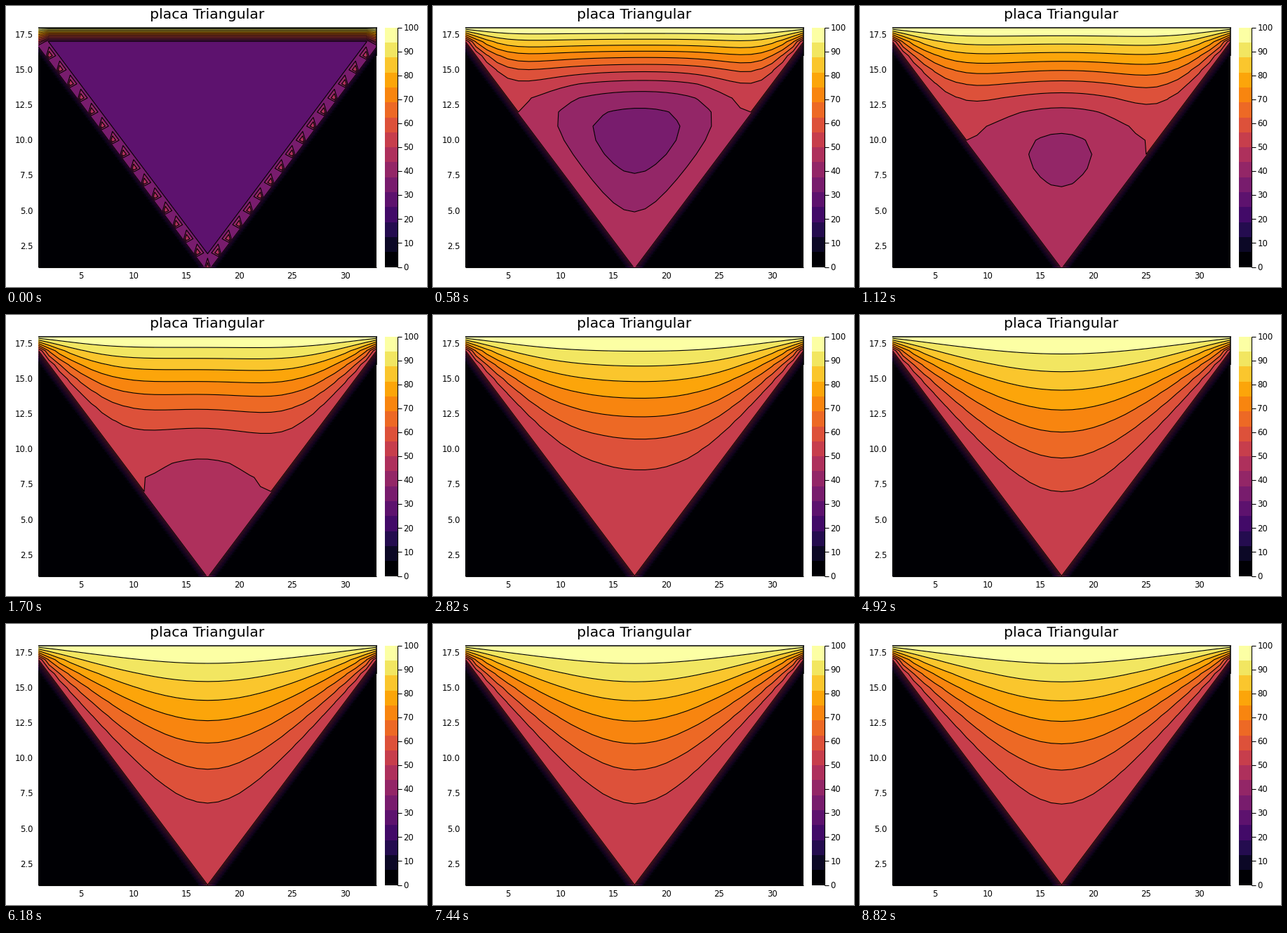
Animation, 600 px wide and 400 px high, one loop 8840 ms. Source, as a matplotlib script:

```python
import numpy as np
import matplotlib
import matplotlib.pyplot as plt
from matplotlib.animation import FuncAnimation
from matplotlib.patches import Rectangle

plt.rcParams["font.family"] = "DejaVu Sans"

W, H, DPI = 600, 400, 100
LEFT, RIGHT, TOP, BOTTOM = 46.3, 528.3, 30.7, 371.5
NX, NY, MID = 33, 18, 17
HOT, SIDE, START = 100.0, 50.0, 30.0
STEPS = 190
TICK_MS = 20
TICKS = 442

levels = np.linspace(0, 100, 17)
colors = [matplotlib.colormaps["inferno"](v) for v in np.linspace(0, 1, 16)]


def plate():
    """Triangular plate: hot top row, warm slanted sides, zero outside."""
    t = np.zeros((NY, NX))
    for y in range(1, NY):
        reach = y - 1
        t[y - 1, MID - 1 - reach:MID + reach] = START
        t[y - 1, [MID - 1 - reach, MID - 1 + reach]] = SIDE
    t[-1] = HOT
    return t


def sweep(t):
    """One Gauss-Seidel pass over the inner nodes."""
    for y in range(2, NY):
        r, reach = y - 1, y - 2
        for c in range(MID - 1 - reach, MID + reach):
            t[r, c] = (t[r - 1, c] + t[r + 1, c] + t[r, c - 1] + t[r, c + 1]) / 4


def solve():
    t = plate()
    states = [t.copy()]
    for _ in range(STEPS - 1):
        sweep(t)
        states.append(t.copy())
    return states


states = solve()

fig = plt.figure(figsize=(W / DPI, H / DPI), dpi=DPI, facecolor="white")
ax = fig.add_axes([LEFT / W, 1 - BOTTOM / H, (RIGHT - LEFT) / W, (BOTTOM - TOP) / H])
ax.set(xlim=(1, NX), ylim=(1, NY), xticks=[], yticks=[], facecolor="black")
for spine in ax.spines.values():
    spine.set_visible(False)

# Overlay in pixel coordinates, y pointing down
over = fig.add_axes([0, 0, 1, 1], facecolor="none")
over.set(xlim=(0, W), ylim=(H, 0))
over.axis("off")


def px(x):
    return LEFT + (x - 1) * (RIGHT - LEFT) / (NX - 1)


def py(y):
    return BOTTOM - (y - 1) * (BOTTOM - TOP) / (NY - 1)


def label(x, y, s, ha, size=8.35):
    over.text(x, y, s, ha=ha, va="baseline", fontsize=size, color="black")


def line(x, y, lw=0.8):
    over.plot(x, y, color="black", lw=lw, solid_capstyle="butt")


label(286.5, 18, "placa Triangular", "center", 14.7)
for v in range(5, 31, 5):
    label(px(v), 388, str(v), "center")
for v in np.arange(2.5, 18, 2.5):
    label(38.3, py(v) + 4.2, f"{v:.1f}", "right")

line([LEFT, RIGHT + 0.5], [TOP, TOP], 1.1)
line([RIGHT, RIGHT], [TOP, py(16)], 1.1)
line([LEFT, RIGHT], [BOTTOM, BOTTOM])

# Colour bar
BAR_X, BAR_W = 540.3, 18
band = (BOTTOM - TOP) / len(colors)
for i, c in enumerate(colors):
    over.add_patch(Rectangle((BAR_X, BOTTOM - (i + 1) * band), BAR_W, band,
                             facecolor=c, lw=0, antialiased=False))
line([BAR_X + BAR_W] * 2, [TOP, BOTTOM])
for v in range(0, 101, 10):
    y = BOTTOM - v / 100 * (BOTTOM - TOP)
    line([BAR_X + BAR_W, 564], [y, y])
    label(566.3, y + 4.2, str(v), "left")

xs, ys = np.arange(1, NX + 1), np.arange(1, NY + 1)
shown = {"step": None, "sets": []}


def step_at(tick):
    """Three steps per seven ticks, held for 20, 100 and 20 ms."""
    group, rest = divmod(tick, 7)
    return 3 * group + (rest >= 1) + (rest >= 6)


def update(tick):
    step = step_at(tick)
    if step == shown["step"]:
        return
    for s in shown["sets"]:
        s.remove()
    z = states[step]
    shown["sets"] = [
        ax.contourf(xs, ys, z, levels=levels, colors=colors),
        ax.contour(xs, ys, z, levels=levels[1:-1], colors="black", linewidths=0.8),
    ]
    shown["step"] = step


anim = FuncAnimation(fig, update, frames=TICKS, interval=TICK_MS,
                     repeat=True, repeat_delay=0, blit=False)
plt.show()
```
